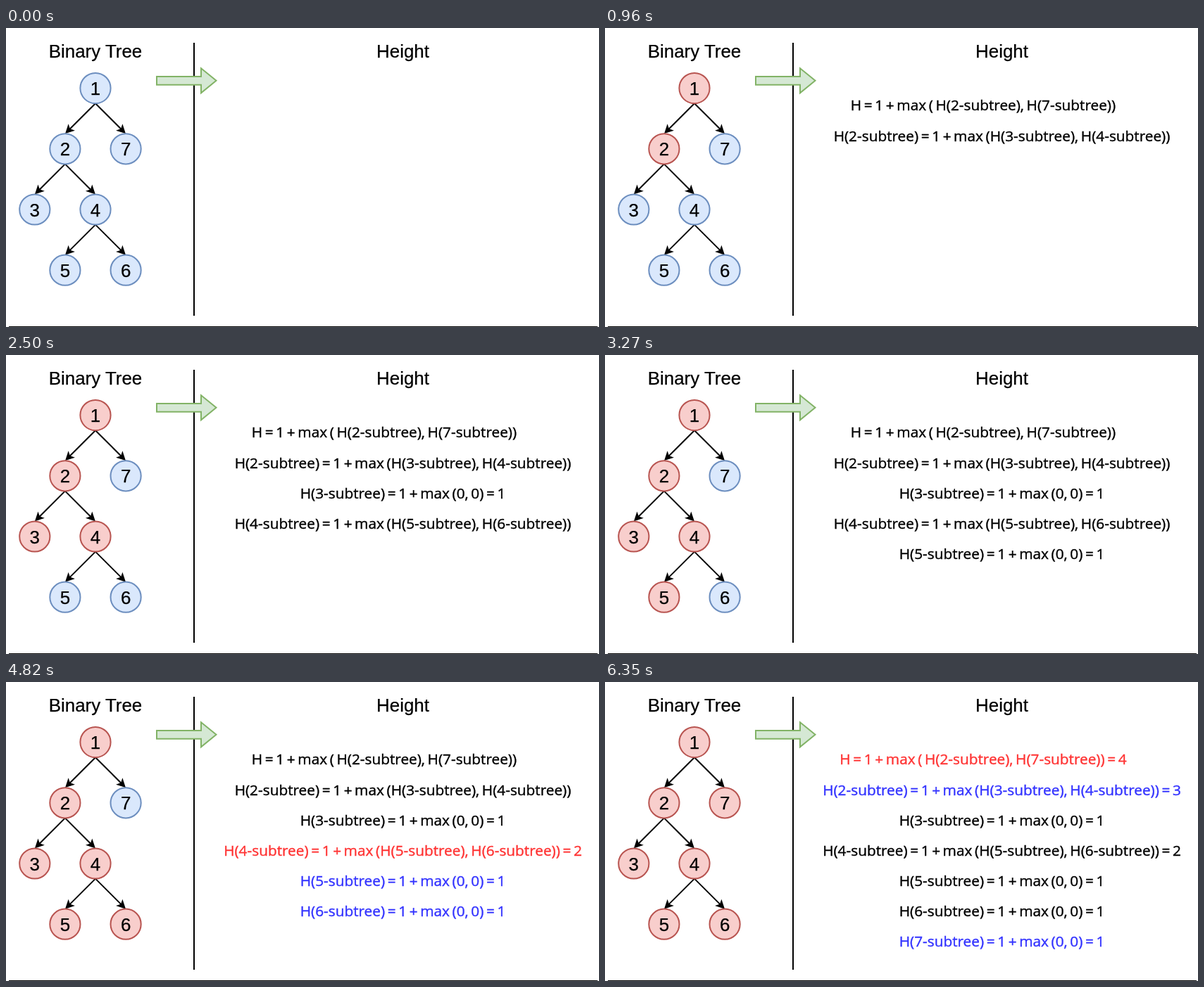
Write an HTML page that moves like this. It is 842 px wide and 425 px high and loops after 6930 ms.

```html
<!DOCTYPE html>
<html lang="en">
<head>
<meta charset="utf-8">
<title>Binary tree height</title>
<style>
  html, body { margin: 0; width: 100%; height: 100%; overflow: hidden; background: #fff; }
  svg { display: block; }
  text { text-anchor: middle; font: 25.9px "Liberation Sans", Arial, sans-serif; stroke: #000; stroke-width: .25; }
  .formula { font: 20.8px "Open Sans", "Noto Sans", sans-serif; word-spacing: -1.8px; fill: currentColor; stroke: currentColor; stroke-width: .4; }
  .edge { stroke: #000; stroke-width: 2; }
  circle { fill: #dae8fc; stroke: #6c8ebf; stroke-width: 2; }
  circle.visited { fill: #f8cecc; stroke: #b85450; }
</style>
</head>
<body>
<svg width="842" height="425" viewBox="0 0 842 425">
  <path d="M267 21V409" stroke="#000" stroke-width="2"/>
  <path d="M4 424.5H840" stroke="#000"/>
  <path d="M214 68.9H277V57.3L298.5 74.8L277 92.3V80.7H214Z" fill="#d5e8d4" stroke="#82b366" stroke-width="2"/>
  <text x="127" y="41.8">Binary Tree</text>
  <text x="563.5" y="41.8">Height</text>
</svg>
<script>
const svg = document.querySelector('svg');
const LOOP = 6930;
const STEPS = [0, 180, 960, 1730, 2500, 3270, 4050, 4820, 5600, 6350];
const GAP = 43.1, RADIUS = 21.6;

// Each node: column and row on the tree grid, its children, the step it is
// visited, and (for inner nodes) the step its height is solved.
const NODES = [
  { id: 1, col: 2, row: 0, kids: [2, 7], visit: 1, solve: 9, height: 4 },
  { id: 2, col: 1, row: 1, kids: [3, 4], visit: 2, solve: 8, height: 3 },
  { id: 3, col: 0, row: 2, visit: 3 },
  { id: 4, col: 2, row: 2, kids: [5, 6], visit: 4, solve: 7, height: 2 },
  { id: 5, col: 1, row: 3, visit: 5 },
  { id: 6, col: 3, row: 3, visit: 6 },
  { id: 7, col: 3, row: 1, visit: 9 }
];

function add(tag, attrs, text = '') {
  const el = document.createElementNS('http://www.w3.org/2000/svg', tag);
  for (const key in attrs) el.setAttribute(key, attrs[key]);
  el.textContent = text;
  return svg.appendChild(el);
}

function addEdge(x, y, side) {
  const startY = y + RADIUS;
  const tipX = x + side * (GAP - 1.7), tipY = startY + GAP - 1.7;
  const back = (dx, dy) => `${tipX - side * dx} ${tipY - dy}`;
  add('path', { class: 'edge', d: `M${x} ${startY}L${back(4.6, 4.6)}`, fill: 'none' });
  add('path', { class: 'edge', d: `M${tipX} ${tipY}L${back(9.2, 3)}L${back(4.6, 4.6)}L${back(3, 9.2)}Z` });
}

function formula(node) {
  const sub = id => `H(${id}-subtree)`;
  const name = node.id === 1 ? 'H' : sub(node.id);
  if (!node.kids) return `${name} = 1 + max (0, 0) = 1`;
  const pad = node.id === 1 ? ' ' : '';
  return `${name} = 1 + max (${pad}${node.kids.map(sub).join(', ')})`;
}

for (const node of NODES) {
  node.x = 40.8 + node.col * GAP;
  node.y = 85.6 + node.row * 2 * GAP;
  if (node.kids) [-1, 1].forEach(side => addEdge(node.x, node.y, side));
}
NODES.forEach((node, i) => {
  node.circle = add('circle', { cx: node.x, cy: node.y, r: RADIUS });
  add('text', { x: node.x, y: node.y + 9.6 }, node.id);
  node.line = add('text', { class: 'formula', x: i ? 563.5 : 537, y: 117.4 + i * GAP });
});

function color(node, step) {
  if (node.solve === step) return '#ff3333';
  const solving = NODES.find(n => n.solve === step);
  return solving && solving.kids.includes(node.id) ? '#3333ff' : '#000';
}

let shown = -1;
function draw(now) {
  const t = now % LOOP;
  const step = STEPS.filter(start => start <= t).length - 1;
  if (step !== shown) {
    shown = step;
    for (const node of NODES) {
      const visited = step >= node.visit;
      node.circle.classList.toggle('visited', visited);
      node.line.textContent = visited
        ? formula(node) + (step >= node.solve ? ` = ${node.height}` : '') : '';
      node.line.style.color = color(node, step);
    }
  }
}

const begin = performance.now();
function tick() {
  draw(performance.now() - begin);
  requestAnimationFrame(tick);
}
tick();
</script>
</body>
</html>
```
